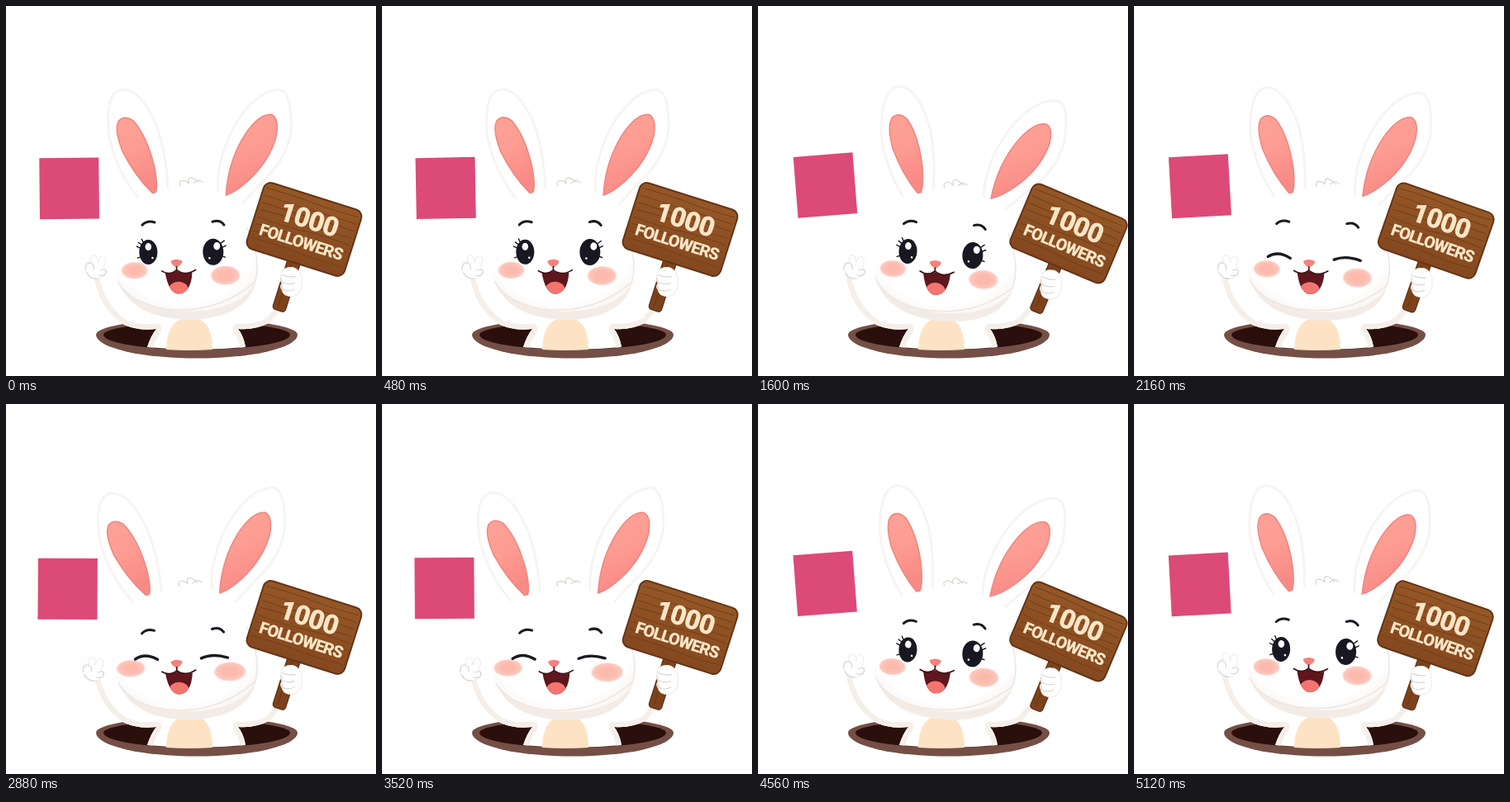
Write an HTML page that moves like this. It is 448 by 448 pixels and loops after 5200 ms.

```html
<!DOCTYPE html>
<html lang="en">
<head>
<meta charset="utf-8">
<title>Bunny with a sign</title>
<style>
  html, body { margin: 0; width: 100%; height: 100%; overflow: hidden; background: #fff; }
  svg { display: block; width: 100%; height: 100%; }
  .line { fill: none; stroke-linecap: round; stroke-linejoin: round; }
  .fur { fill: #fff; stroke: #efebe7; stroke-width: 1; }
  .ear { fill: #fff; stroke: #f7f4f2; stroke-width: 3; }
  .ink { stroke: #1b1a22; }
  .fold { stroke: #dad4cf; stroke-width: 1.2; }
  .shade { stroke: #f5efea; }
  .pink { fill: url(#innerEar); stroke: #f08580; stroke-width: 1.5; }
  text { font-family: Roboto, "Open Sans", sans-serif; font-weight: 800; fill: #fbe5c6; text-anchor: middle; letter-spacing: -1px; }
</style>
</head>
<body>
<svg viewBox="0 0 448 448">
  <defs>
    <radialGradient id="headFur" cx=".48" cy=".42" r=".6">
      <stop offset=".85" stop-color="#fff"/><stop offset="1" stop-color="#faf7f5"/>
    </radialGradient>
    <linearGradient id="innerEar" x1="0" y1="0" x2=".3" y2="1">
      <stop offset="0" stop-color="#fda297"/><stop offset=".5" stop-color="#fd9c92"/><stop offset="1" stop-color="#f88a85"/>
    </linearGradient>
    <radialGradient id="blush">
      <stop offset=".4" stop-color="#fcbaad"/><stop offset=".8" stop-color="#fdc8bd"/><stop offset="1" stop-color="#fff" stop-opacity="0"/>
    </radialGradient>
    <linearGradient id="wood" x2="0" y2="1">
      <stop offset="0" stop-color="#955726"/><stop offset="1" stop-color="#85481f"/>
    </linearGradient>
    <clipPath id="mouthShape"><path d="M193 323Q201 325 207 321Q215 326 226 323Q224 349 208 349Q197 347 193 323Z"/></clipPath>
    <path id="bodyShape" d="M106 325Q112 366 143 386Q162 394 182 391Q175 400 171 413Q230 419 290 413Q288 400 281 391Q301 393 320 383L347 350L330 315L290 330L160 330L122 322Z"/>
    <clipPath id="bodyClip"><use href="#bodyShape"/></clipPath>
  </defs>

  <rect id="badge" x="-36" y="-37" width="72" height="74" fill="#dc4a78"/>

  <path d="M109 398A122 19 0 0 1 353 398A122 28.5 0 0 1 109 398Z" fill="#754f45"/>
  <path d="M118 398A113 15 0 0 1 344 398A113 18 0 0 1 118 398Z" fill="#2a0f0c"/>

  <!-- body and arms -->
  <use href="#bodyShape" fill="#fff"/>
  <g clip-path="url(#bodyClip)">
    <path class="line shade" stroke-width="13" d="M106 325Q112 366 143 386Q162 394 182 391Q175 400 171 413M290 413Q288 400 281 391Q301 393 320 383L347 350"/>
  </g>
  <path d="M194 416Q195 377 223 377Q250 377 250 416Q222 418 194 416Z" fill="#fde3c4"/>

  <g id="paw">
    <path class="fur" d="M-14 0Q-15 -9 -7 -7Q-9 -16 -3 -15Q1 -14 1 -6Q3 -16 8 -14Q13 -11 8 0Q14 4 9 9Q0 17 -8 11Q-15 8 -14 0Z"/>
    <path class="line fold" d="M-14 2Q-14 -6 -8 -6Q-3 -5 -4 2M4 3Q12 0 11 6Q9 11 2 9M-12 6Q-8 14 0 13"/>
  </g>

  <g id="leftEar">
    <path class="ear" d="M-19 6Q-45 -28 -53 -70Q-57 -122 -37 -126Q-13 -128 6 -78Q16 -45 17 -4"/>
    <path class="pink" d="M-2 0Q-22 -20 -37 -51Q-47 -78 -41 -88Q-34 -96 -23 -88Q-7 -69 1 -32Q5 -9 2 -1Z"/>
  </g>
  <g id="rightEar">
    <path class="ear" d="M-10 0Q-14 -40 10 -84Q36 -127 66 -128Q81 -124 79 -78Q74 -47 50 -23Q34 -7 18 10"/>
    <path class="pink" d="M-1 -1Q2 -42 23 -74Q40 -99 55 -98Q65 -94 61 -72Q53 -42 26 -18Q10 -4 -1 -1Z"/>
  </g>

  <!-- head, drawn around the nose -->
  <g id="head"><g transform="translate(-207 -312)">
    <path d="M137 336C150 366 180 380 226 380C266 379 297 365 303 333Z" fill="#f3ece6"/>
    <path d="M224 219C262 219 283 240 293 270C304 292 310 314 303 333C295 356 263 370 224 370C178 370 143 352 135 332C130 312 143 290 152 266C164 236 188 219 224 219Z" fill="url(#headFur)"/>
    <path class="line" d="M136 334Q150 359 193 367Q255 375 302 335Q310 308 293 270" stroke="#eee6e0" stroke-width="1.5"/>
    <path class="line fold" d="M213 218Q210 213 215 212Q219 211 223 215Q221 209 226 208Q231 210 235 214M229 215Q235 209 240 214"/>
    <g id="cheeks" fill="url(#blush)">
      <ellipse cx="156" cy="320" rx="18" ry="11.5"/>
      <ellipse cx="266" cy="327" rx="20" ry="13"/>
    </g>
    <path id="brows" class="line ink" stroke-width="3" d="M166 265Q172 259 181 262M251 262Q260 259 265 266"/>
    <g id="openEyes">
      <path class="line ink" stroke-width="1.4" d="M165 289L161 286M163 293L159 291M167 286L165 282M261 288L265 285M263 293L267 291M163 304L160 305M263 304L266 305"/>
      <g fill="#181722">
        <ellipse cx="173" cy="298" rx="11" ry="15"/>
        <ellipse cx="251.5" cy="298.5" rx="12.5" ry="16"/>
      </g>
      <g fill="#fff">
        <ellipse cx="173" cy="291.5" rx="3.8" ry="4.5"/><ellipse cx="256" cy="291.5" rx="4" ry="4.7"/>
        <circle cx="178" cy="305" r="1.3"/><circle cx="247" cy="306" r="1.3"/>
      </g>
    </g>
    <path id="closedEyes" class="line ink" stroke-width="3.4" d="M157 305Q169 297 184 306M237 306Q251 300 269 306"/>
    <path d="M200 309Q207 305 214 309Q214 313 207 317Q200 313 200 309Z" fill="#f5817c"/>
    <g clip-path="url(#mouthShape)">
      <path d="M180 310H235V355H180Z" fill="#5d171d"/>
      <ellipse cx="209" cy="344" rx="12" ry="10" fill="#f4756f"/>
    </g>
    <path class="line" stroke="#3d1217" stroke-width="1.7" d="M189 321Q199 327 207 320Q217 328 230 320M207 316V320"/>
  </g></g>

  <g id="sign">
    <rect x="-8" y="38" width="16" height="65" rx="4" fill="#7d421c" stroke="#5c3016" stroke-width="1.2"/>
    <path class="line" d="M-2 45V98" stroke="#68360f"/>
    <rect x="-62" y="-42" width="124" height="84" rx="9" fill="url(#wood)" stroke="#643518" stroke-width="2"/>
    <path id="grain" class="line" stroke="#72401b"/>
    <text x="2" y="-2" font-size="33">1000</text>
    <text x="1" y="22.5" font-size="20">FOLLOWERS</text>
    <g transform="translate(4 65) rotate(-18)">
      <path class="fur" d="M-11 -12Q-8 -18 3 -17Q14 -13 13 2Q13 15 2 18Q-10 18 -11 10Q-14 6 -11 2Q-15 -4 -11 -12Z"/>
      <path class="line fold" d="M-11 -8Q-4 -5 5 -6M-12 -5Q-12 2 -8 2Q-1 4 4 2M-11 4Q-12 10 -6 11Q0 12 4 9"/>
    </g>
  </g>
</svg>
<script>
const LOOP = 5200, STEP = 80;
const SWAY_PERIOD = 2920, SWAY_PEAK = 1600;
const part = id => document.getElementById(id);
const place = (id, x, y, angle = 0) =>
  part(id).setAttribute("transform", `translate(${x} ${y}) rotate(${angle})`);
const show = (id, visible) => part(id).setAttribute("visibility", visible ? "visible" : "hidden");

function ease(from, to, t) {
  const u = Math.min(1, Math.max(0, (t - from) / (to - from)));
  return u * u * (3 - 2 * u);
}

function drawGrain() {
  let d = "";
  for (let y = -34; y <= 34; y += 9) {
    const bend = 3 * Math.sin(y);
    d += `M-58 ${y}Q-25 ${y + bend} 0 ${y}T58 ${y}`;
  }
  part("grain").setAttribute("d", d);
}

function draw(now) {
  const t = Math.floor((now % LOOP) / STEP) * STEP;
  const sway = Math.cos(2 * Math.PI * (t - SWAY_PEAK) / SWAY_PERIOD);
  const swing = ((1 + sway) / 2) ** 3; // lingers low, peaks sharply
  const laugh = ease(2160, 2880, t) - ease(3800, 4800, t);

  place("head", 210.5 + 4.2 * sway, 311.7 + 1.3 * swing + 3 * laugh, 1.3 + 2 * sway - laugh);
  place("leftEar", 187 + 8 * sway - 8 * laugh, 226.5 + 5 * laugh, 2 + 3.5 * sway - 3 * laugh);
  place("rightEar", 275 + 8 * sway - 8 * laugh, 230 + 4 * swing, 7.5 * swing - 0.8);
  place("sign", 361 + 15 * swing, 270.5 + 5 * swing, 17.6 + 5.2 * swing);
  place("badge", 79 + 2.5 * sway - 2 * laugh, 219 - 2 * sway + 3 * laugh, -2.5 - 2 * sway + laugh);
  place("paw", 114 + 4 * sway - 3 * laugh, 317 + 5 * laugh);
  place("brows", 0, 9 * laugh);

  const spread = 1 + 0.09 * laugh;
  part("cheeks").setAttribute("transform",
    `translate(207 ${312 - 4 * laugh}) scale(${spread} 1) translate(-207 -312)`);

  const closed = t >= 2080 && t < 4560;
  show("openEyes", !closed);
  show("closedEyes", closed);
}

drawGrain();
const start = performance.now();
function tick() {
  draw(performance.now() - start);
  requestAnimationFrame(tick);
}
tick();
</script>
</body>
</html>
```
